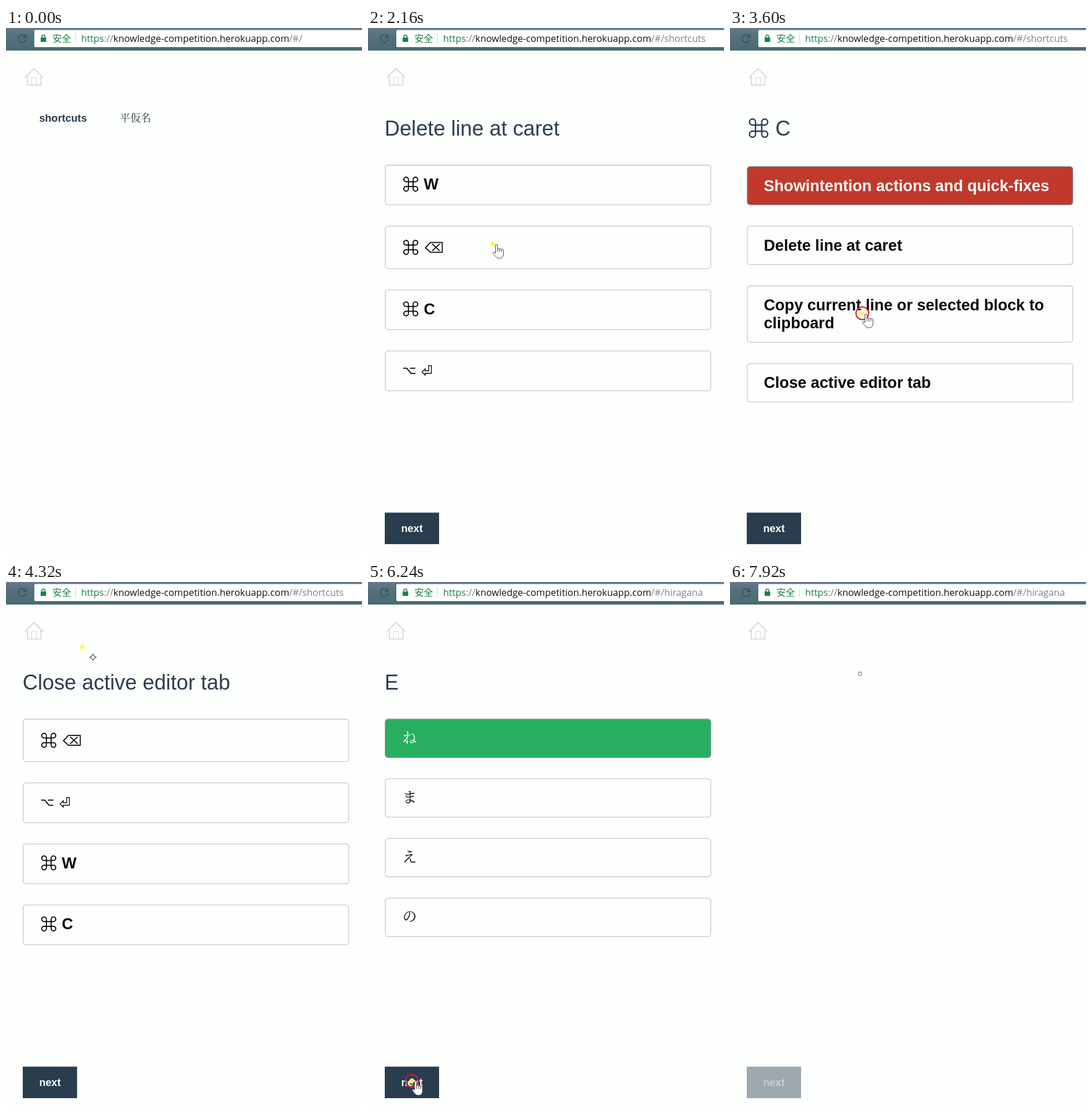
An HTML page with a canvas for the animation above (8 s loop, 616x909 px).

```html
<!DOCTYPE html>
<html>
<head>
<meta charset="utf-8">
<style>
  html, body { margin: 0; width: 100%; height: 100%; overflow: hidden; background: #fdfffc; }
  canvas { display: block; }
</style>
</head>
<body>
<canvas id="stage" width="616" height="909"></canvas>
<script>
const ctx = document.getElementById('stage').getContext('2d');
const LOOP = 8000, FADE = 240;
const INK = '#2c3e50', RIGHT = '#27ae60', WRONG = '#c0392b';
const SANS = '"Liberation Sans", Arial, sans-serif';
const CJK = '"Noto Serif CJK JP", "Noto Sans CJK JP", "Noto Sans CJK", serif';
const URL_FONT = '16.37px "Open Sans", sans-serif';

const DELETE = 'Delete line at caret', CLOSE = 'Close active editor tab';
const home = start => ({ start, path: '' });
const quiz = (start, path, title, cards, picks = [], enter = false) =>
  ({ start, path, title, cards, picks, enter });

// Each pick is [time, card index, colour].
const screens = [
  home(0),
  quiz(560, 'shortcuts', DELETE, ['⌘W', '⌘⌫', '⌘C', '⌥⏎'], [[2320, 1, RIGHT]], true),
  quiz(2720, 'shortcuts', '⌘C',
    ['Showintention actions and quick-fixes', DELETE,
     'Copy current line or selected block to|clipboard', CLOSE],
    [[3280, 0, WRONG], [3680, 2, RIGHT]]),
  quiz(4000, 'shortcuts', CLOSE, ['⌘⌫', '⌥⏎', '⌘W', '⌘C']),
  home(4480),
  quiz(4760, 'hiragana', 'YO', ['き', 'よ', 'む', 'た'], [[5240, 1, RIGHT]], true),
  quiz(5400, 'hiragana', 'NO', ['の', 'よ', 'え', 'ね'], [[5920, 0, RIGHT]]),
  quiz(6240, 'hiragana', 'E', ['ね', 'ま', 'え', 'の']),
  home(6640),
  quiz(6877, 'hiragana', 'KA', ['か', 'さ', 'ぬ', 'り'], [], true),
  home(7640),
  quiz(7814, 'hiragana', 'KA', ['か', 'さ', 'ぬ', 'り'], [], true)
];

// Pointer track: [time, x, y, look]; the look holds until the next stop.
const track = [
  [0, 0, 0, ''], [400, 150, 220, 'arrow'], [520, 98, 156, 'hand'], [640, 98, 156, 'busy'],
  [1360, 98, 156, 'arrow'], [2080, 216, 373, 'hand'], [2400, 216, 373, 'arrow'],
  [2640, 76, 862, 'hand'], [2880, 76, 862, 'arrow'], [3200, 225, 272, 'hand'],
  [3360, 225, 272, 'hand'], [3600, 229, 493, 'hand'], [3720, 229, 493, 'arrow'],
  [3920, 76, 862, 'hand'], [4080, 76, 862, 'arrow'], [4320, 132, 112, 'spark'],
  [4400, 48, 86, 'hand'], [4520, 60, 100, 'arrow'], [4700, 222, 156, 'hand'],
  [4780, 225, 158, 'busy'], [5000, 225, 170, 'arrow'], [5180, 216, 373, 'hand'],
  [5300, 76, 862, 'hand'], [5440, 76, 862, ''], [5680, 120, 600, 'arrow'],
  [5840, 205, 270, 'hand'], [6000, 205, 270, 'arrow'], [6160, 76, 862, 'hand'],
  [6360, 76, 862, 'arrow'], [6560, 48, 86, 'hand'], [6680, 60, 100, 'arrow'],
  [6820, 222, 156, 'hand'], [6900, 225, 158, ''], [7360, 120, 220, 'arrow'],
  [7560, 48, 86, 'hand'], [7660, 60, 100, 'arrow'], [7780, 222, 156, 'hand'],
  [7840, 225, 158, 'busy']
];
const clicks = [560, 2240, 2640, 3200, 3600, 3920, 4420, 4720, 5200, 5340, 5880, 6180, 6600, 6840, 7600];

const clamp = v => Math.max(0, Math.min(1, v));

function text(str, x, y, font, color) {
  ctx.font = font;
  ctx.fillStyle = color;
  ctx.fillText(str, x, y);
  return x + ctx.measureText(str).width;
}

function stroke(path, color, width = 1) {
  ctx.strokeStyle = color;
  ctx.lineWidth = width;
  ctx.stroke(new Path2D(path));
}

function at(x, y, draw) {
  ctx.save();
  ctx.translate(x, y);
  draw();
  ctx.restore();
}

function circle(x, y, r) {
  ctx.beginPath();
  ctx.arc(x, y, r, 0, 2 * Math.PI);
}

function commandKey(x, y, scale, color) {
  at(x, y, () => {
    ctx.scale(scale, scale);
    ctx.strokeStyle = color;
    ctx.lineWidth = 1.9;
    const inner = 4.1, outer = 8.1;
    for (let i = 0; i < 4; i++) {
      ctx.beginPath();
      ctx.moveTo(-outer, inner);
      ctx.lineTo(outer, inner);
      ctx.stroke();
      ctx.beginPath();
      ctx.arc(outer, outer, outer - inner, -Math.PI / 2, Math.PI);
      ctx.stroke();
      ctx.rotate(Math.PI / 2);
    }
  });
}

function drawBrowser(path) {
  const bar = ctx.createLinearGradient(0, 0, 0, 39);
  bar.addColorStop(0, '#66788a');
  bar.addColorStop(0.4, '#53717b');
  bar.addColorStop(1, '#4a6a71');
  ctx.fillStyle = bar;
  ctx.fillRect(0, 0, 616, 39);
  ctx.fillStyle = '#fff';
  ctx.beginPath();
  ctx.roundRect(49, 3.5, 580, 29.5, 2);
  ctx.fill();

  stroke('M33.5 14.5 A6.7 6.7 0 1 0 34.5 19.5 M34.5 11 V16 H29.5', '#3f4f5a', 1.8);
  ctx.fillStyle = '#188044';
  ctx.fillRect(60, 16.5, 9.5, 7.5);
  stroke('M62 17 V15 a2.7 2.7 0 0 1 5.4 0 V17', '#188044', 1.5);
  text('安全', 80.5, 24, '16px "Noto Sans CJK SC", "Noto Sans CJK JP", sans-serif', '#188044');
  stroke('M120.5 9 V27', '#cfd2d3');

  let x = text('https', 130, 24, URL_FONT, '#188044');
  x = text('://', x, 24, URL_FONT, '#7d8285');
  x = text('knowledge-competition.herokuapp.com', x, 24, URL_FONT, '#111');
  text('/#/' + path, x, 24, URL_FONT, '#7d8285');
}

function drawHouse() {
  stroke('M32.5 86 L48.5 70 L64.5 86 M37 83 V98.5 H60.5 V83', '#dadcdb', 2);
  stroke('M44.5 98 V85.5 H52.5 V98', '#dadcdb', 1.2);
}

function cardHeight(label) {
  if (label.includes('⌫')) return 73.3;
  if (/[⌘⌥]/.test(label)) return 68.7;
  return label.includes('|') ? 97.6 : 66.3;
}

function drawLabel(label, top, height, color) {
  const mid = top + height / 2, font = `bold 27.1px ${SANS}`;
  if (label[0] === '⌘') {
    commandKey(74, mid - (label[1] === '⌫' ? 0 : 1.5), 1, color);
    if (label[1] === '⌫') {
      at(0, mid, () => stroke(
        'M99.5 0.5 L108 -8.5 H128.5 V8.5 H108 Z M111 -6 L124 6 M124 -6 L111 6', color, 1.8));
    } else {
      text(label[1], 96.5, top + 42.3, font, color);
    }
  } else if (label[0] === '⌥') {
    at(0, mid, () => {
      stroke('M61 -4.5 H67 L74.5 4.5 H82 M72.5 -4.5 H82', color, 1.8);
      stroke('M93.5 2 L99 -3.5 V0 H105 V-9 H109.7 V4.3 H99 V7.5 Z', color, 1.4);
    });
  } else if (label.length === 1) {
    text(label, 59.5, mid + 8, `25px ${CJK}`, color);
  } else {
    label.split('|').forEach((line, i) => text(line, 58.5, top + 42.2 + i * 31.2, font, color));
  }
}

function drawCard(label, top, fill, alpha) {
  const height = cardHeight(label);
  ctx.beginPath();
  ctx.roundRect(29.8, top, 563.4, height, 5);
  if (fill) {
    ctx.save();
    ctx.globalAlpha *= alpha;
    ctx.fillStyle = fill;
    ctx.fill();
    ctx.restore();
  }
  ctx.strokeStyle = fill ? '#8195a5' : '#c5c8ca';
  ctx.lineWidth = 1.3;
  ctx.stroke();
  drawLabel(label, top, height, fill && alpha > 0.5 ? '#fdfffc' : '#0a0a0a');
  return top + height + 36.8;
}

function drawQuiz(screen, previous, t) {
  const age = t - screen.start;
  ctx.globalAlpha = screen.enter ? clamp(age / FADE) : 1;
  ctx.fillStyle = '#293d4f';
  ctx.fillRect(29, 837.5, 94, 54.5);
  text('next', 57.5, 871, `bold 18.1px ${SANS}`, '#fff');

  ctx.globalAlpha = screen.enter ? clamp((age - 320) / 160) : 1;
  const symbolTitle = screen.title[0] === '⌘';
  if (symbolTitle) commandKey(49.5, 173, 1.3, INK);
  text(symbolTitle ? 'C' : screen.title, symbolTitle ? 78.5 : 28.7, 186, `36.3px ${SANS}`, INK);

  // Colours of the preceding question's answers linger briefly.
  const marks = {};
  const linger = 1 - age / 150;
  if (!screen.enter && linger > 0) {
    for (const [, index, color] of previous.picks) marks[index] = [color, linger];
  }
  for (const [time, index, color] of screen.picks) {
    if (t >= time) marks[index] = [color, 1];
  }
  let top = symbolTitle ? 239.3 : 237;
  screen.cards.forEach((label, i) => { top = drawCard(label, top, ...(marks[i] || [])); });
  ctx.globalAlpha = 1;
}

function drawHome() {
  text('shortcuts', 57.5, 162, `bold 18.1px ${SANS}`, '#293b4a');
  text('平仮名', 197, 162, `18.1px ${CJK}`, '#293b4a');
}

function drawPointer(t) {
  const i = track.findLastIndex(stop => stop[0] <= t);
  const [t0, x0, y0, look] = track[i];
  if (!look) return;
  const [t1, x1, y1] = track[i + 1] || [LOOP, x0, y0];
  const k = clamp((t - t0) / (t1 - t0)), ease = k * k * (3 - 2 * k);
  at(x0 + (x1 - x0) * ease, y0 + (y1 - y0) * ease, () => {
    if (look === 'busy') {
      circle(0, 0.5, 3);
      ctx.strokeStyle = '#888c8c';
      ctx.lineWidth = 1.3;
      ctx.stroke();
      return;
    }
    circle(0, 0, 4.3);
    ctx.fillStyle = '#fff96b';
    ctx.fill();
    if (clicks.some(c => t >= c && t < c + 80)) {
      circle(0, 0, 11);
      ctx.strokeStyle = '#dc1730';
      ctx.lineWidth = 2;
      ctx.stroke();
    }
    if (look === 'spark') {
      stroke('M18.5 12.5 L20.5 16 L24 18 L20.5 20 L18.5 23.5 L16.5 20 L13 18 L16.5 16 Z', '#555', 1.2);
      return;
    }
    const shape = new Path2D(look === 'hand'
      ? 'M4.5 2 q2 -2 3.5 0 V9 q2 -2 3.3 0 q2 -1.5 3.3 0.5 q2.8 -1 3.8 1 V18 q-1 7 -6 7 h-3 q-4 -1 -9 -9 q1 -3 4.1 0 Z M8 9 V14 M11.3 9 V14 M14.6 9.5 V14'
      : 'M1 1 V17 L5 13.5 L8 20 L10.5 19 L7.5 12.5 H13 Z');
    ctx.fillStyle = '#fff';
    ctx.fill(shape);
    ctx.strokeStyle = '#444';
    ctx.lineWidth = 1;
    ctx.stroke(shape);
  });
}

function render(now) {
  const t = now % LOOP;
  const i = screens.findLastIndex(s => s.start <= t);
  const screen = screens[i];
  ctx.fillStyle = '#fdfffc';
  ctx.fillRect(0, 0, 616, 909);
  drawBrowser(screen.path);
  drawHouse();
  if (screen.cards) drawQuiz(screen, screens[i - 1], t);
  else drawHome();
  drawPointer(t);
  requestAnimationFrame(render);
}
requestAnimationFrame(render);
</script>
</body>
</html>
```
